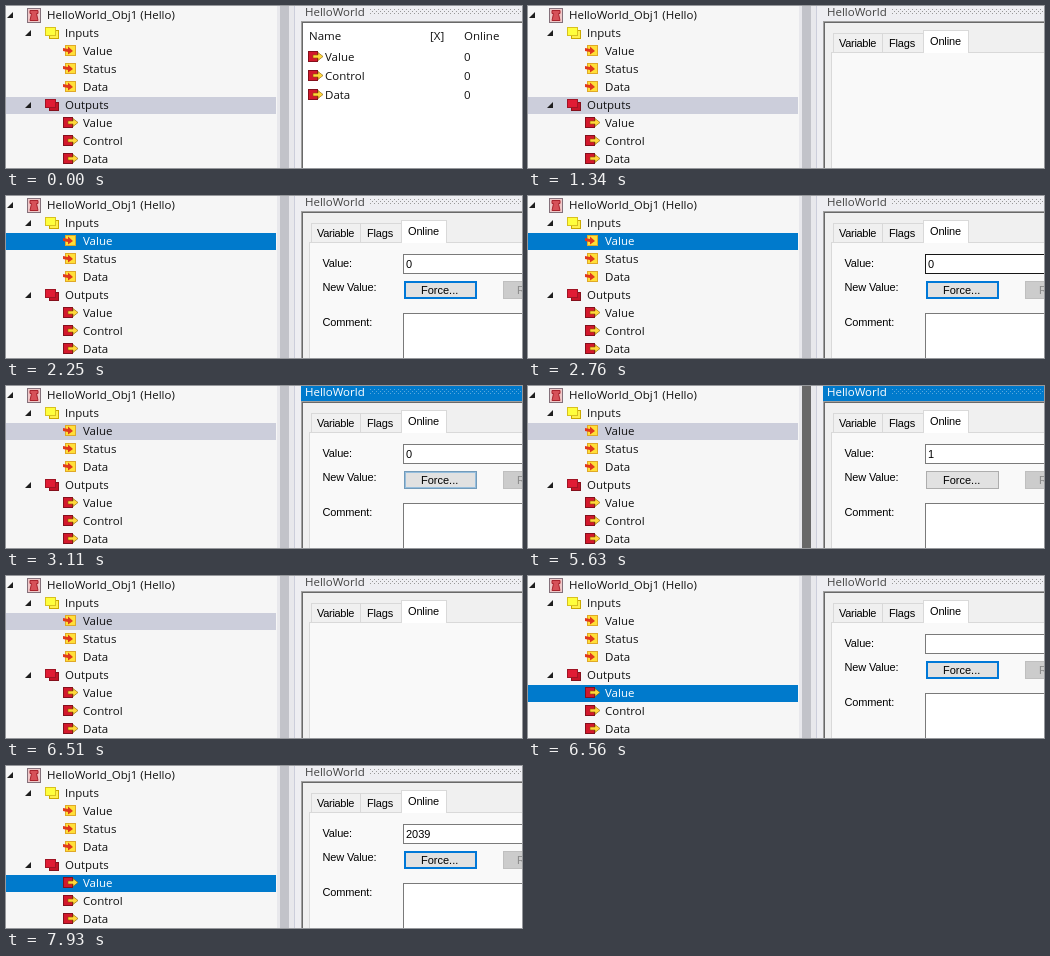
These frames come from a looping animation (516x162 px, 8000 ms). An HTML page:

```html
<!DOCTYPE html>
<html lang="en">
<head>
<meta charset="utf-8">
<title>Object tree and online view</title>
<style>
  html, body { margin: 0; width: 100%; height: 100%; overflow: hidden; background: #eeeef2; }
  svg { display: block; width: 516px; height: 162px; }
  text { font: 11.5px "Open Sans", "Noto Sans", sans-serif; fill: #111; white-space: pre; }
  .form text { font: 11px "Liberation Sans", Arial, sans-serif; letter-spacing: -.15px; fill: #000; }
  .form .plain { letter-spacing: 0; }
  .form .tab { letter-spacing: -.3px; }
  .crisp, rect { shape-rendering: crispEdges; }
</style>
</head>
<body>
<svg id="stage" viewBox="0 0 516 162">
  <defs>
    <pattern id="grip" width="4" height="4" x="364" y="3" patternUnits="userSpaceOnUse">
      <path class="crisp" d="M0 0h1v1h-1zM2 2h1v1h-1z"/>
    </pattern>
    <g id="object">
      <rect x=".5" y=".5" width="13" height="14" fill="#f0c8c8" stroke="#84707a"/>
      <path d="M3 2.5h8v3H9.5l1.5 7H3l1.5-7H3z" fill="#d65058" stroke="#a8222c"/>
    </g>
    <g id="inputs">
      <rect x="4.5" y="3.5" width="9" height="8" fill="#fff04a" stroke="#c9a800"/>
      <rect x=".5" y=".5" width="10" height="8" fill="#ffff3c" stroke="#d8c020"/>
    </g>
    <g id="outputs">
      <rect x="4.5" y="3.5" width="9" height="8" fill="#c81428" stroke="#84101c"/>
      <rect x=".5" y=".5" width="10" height="8" fill="#e01c34" stroke="#a01424"/>
    </g>
    <g id="in">
      <rect x="2.5" y=".5" width="10" height="10" fill="#ffdf38" stroke="#e0a828"/>
      <path d="M0 3l5 1V1.5L10 6 5 9.5V7L0 6z" fill="#e0381c"/>
    </g>
    <g id="out">
      <rect x=".5" y=".5" width="9" height="10" fill="#d3182c" stroke="#84101c"/>
      <path d="M5 4h5V1.5L15 5.5l-5 4V7H5z" fill="#ffd83c" stroke="#8a5a00" stroke-width=".6"/>
    </g>
  </defs>

  <rect width="271" height="162" fill="#f6f6f6"/>
  <rect id="selection" y="1" width="270" height="17"/>
  <g id="tree"></g>
  <rect x="271" width="17" height="162" fill="#e8e8ec"/>
  <rect id="thumb" x="274" width="9" height="162"/>
  <rect x="288" width="1" height="162" fill="#ccceDB"/>

  <rect id="caption" x="295" width="221" height="15"/>
  <text id="heading" x="299" y="10">HelloWorld</text>
  <rect id="dots" x="364" y="3" width="152" height="6" fill="url(#grip)"/>

  <rect x="295" y="15" width="221" height="147" fill="#a0a0a0"/>
  <rect x="296" y="16" width="220" height="146" fill="#696969"/>
  <rect x="297" y="17" width="219" height="145" fill="#f0f0f0"/>

  <g class="form">
    <g class="crisp" stroke="#d9d9d9" fill="#f0f0f0">
      <rect x="303.5" y="46.5" width="220" height="120" fill="#f9f9f9"/>
      <rect x="305.5" y="27.5" width="49" height="19"/>
      <rect x="354.5" y="27.5" width="41" height="19"/>
      <path d="M395.5 47V24.5h45V47" fill="#fff"/>
    </g>
    <text class="tab" x="311" y="41">Variable</text>
    <text x="361" y="41">Flags</text>
    <text x="402" y="39">Online</text>
    <g id="fields">
      <text x="316.5" y="71">Value:</text>
      <text x="316.5" y="95">New Value:</text>
      <text x="316.5" y="130">Comment:</text>
      <rect id="edit" x="397.5" y="58.5" width="130" height="19" fill="#fff"/>
      <g id="values"></g>
      <rect x="398.5" y="85.5" width="72" height="17" fill="#e1e1e1" stroke="#adadad"/>
      <rect id="focus" x="399" y="86" width="71" height="16" fill="none" stroke="#0078d7" stroke-width="2"/>
      <text class="plain" x="415" y="98">Force...</text>
      <rect x="497.5" y="85.5" width="30" height="17" fill="#ccc" stroke="#bfbfbf"/>
      <text x="511" y="98" style="fill:#8a8a8a">Re</text>
      <rect x="397.5" y="117.5" width="130" height="60" fill="#fff" stroke="#7a7a7a"/>
    </g>
  </g>

  <g id="list">
    <rect x="297" y="17" width="219" height="145" fill="#fff"/>
    <text x="303" y="34">Name</text>
    <text x="424" y="34">[X]</text>
    <text x="458" y="34">Online</text>
    <g id="rows"></g>
  </g>
</svg>
<script>
  const LOOP = 8000;
  const $ = id => document.getElementById(id);
  const css = [];

  // Steps are [ms, declarations, fade]; a step holds unless fade is set.
  function track(id, steps) {
    const keys = steps.map(([ms, decl, fade]) =>
      `${ms / LOOP * 100}%{${decl};animation-timing-function:${fade ? 'linear' : 'step-end'}}`);
    css.push(`@keyframes ${id}{${keys.join('')}}#${id}{${steps[0][1]};animation:${id} ${LOOP}ms step-end infinite}`);
  }
  const on = 'visibility:visible', off = 'visibility:hidden';
  const use = (icon, x, y) => `<use href="#${icon}" x="${x}" y="${y}"/>`;

  // Tree: label, depth, icon
  const nodes = [
    ['HelloWorld_Obj1 (Hello)', 0, 'object'],
    ['Inputs', 1, 'inputs'],
    ['Value', 2, 'in'], ['Status', 2, 'in'], ['Data', 2, 'in'],
    ['Outputs', 1, 'outputs'],
    ['Value', 2, 'out'], ['Control', 2, 'out'], ['Data', 2, 'out']
  ];
  $('tree').innerHTML = nodes.map(([label, depth, icon], i) => {
    const x = depth * 18, y = i * 18;
    const arrow = depth < 2 ? `<path d="M${x + 7} ${y + 6}v6h-6z" fill="#1e1e1e"/>` : '';
    return arrow + use(icon, x + 21, y + (depth ? 3 : 2)) +
      `<text id="node${i}" x="${x + 41}" y="${y + 13}">${label}</text>`;
  }).join('');

  $('rows').innerHTML = ['Value', 'Control', 'Data'].map((name, i) => {
    const y = 55 + i * 19;
    return use('out', 302, y - 10) +
      `<text x="319" y="${y}">${name}</text><text x="458" y="${y}">0</text>`;
  }).join('');

  const row = (i, color) => `transform:translateY(${i * 18}px);fill:${color}`;
  const blue = '#007acc', grey = '#ccceDB';
  track('selection', [[0, row(5, grey)], [1380, row(2, blue)], [2790, row(2, grey)], [6560, row(6, blue)]]);
  track('node2', [[0, 'fill:#111'], [1380, 'fill:#fff'], [2790, 'fill:#111']]);
  track('node6', [[0, 'fill:#111'], [6560, 'fill:#fff']]);

  // The pointer crosses the scroll bar
  track('thumb', [[0, 'fill:#c2c3c9'], [5630, 'fill:#686868'], [5680, 'fill:#c2c3c9']]);

  // Caption is lit while its window has the focus
  const lit = (id, idle, active) => track(id, [[0, idle], [2790, active], [6510, idle]]);
  lit('caption', 'fill:#eeeef2', 'fill:#007acc');
  lit('heading', 'fill:#444', 'fill:#fff');
  lit('grip', 'fill:#999', 'fill:#59a8de');

  track('list', [[0, on], [1340, off]]);
  track('fields', [[0, 'opacity:0'], [1380, 'opacity:1'], [6510, 'opacity:0'], [6560, 'opacity:1']]);
  track('edit', [[0, 'stroke:#7a7a7a'], [2250, 'stroke:#7a7a7a', 1], [2460, 'stroke:#171717'],
    [2790, 'stroke:#171717', 1], [3000, 'stroke:#7a7a7a']]);
  track('focus', [[0, 'opacity:1'], [2790, 'opacity:1', 1], [3270, 'opacity:0'], [6510, 'opacity:1']]);

  // Each value stays until the next one
  const values = [[1380, 0], [5630, 1], [6510, ''], [6720, 1028], [6930, 1217],
    [7130, 1407], [7300, 1576], [7550, 1792], [7930, 2039]];
  $('values').innerHTML = values.map(([, v], i) =>
    `<text id="value${i}" class="plain" x="400" y="72">${v}</text>`).join('');
  values.forEach(([ms], i) => {
    const steps = [[0, off], [ms, on]];
    if (values[i + 1]) steps.push([values[i + 1][0], off]);
    track('value' + i, steps);
  });

  const sheet = document.createElement('style');
  sheet.textContent = css.join('\n');
  document.head.append(sheet);
</script>
</body>
</html>
```
